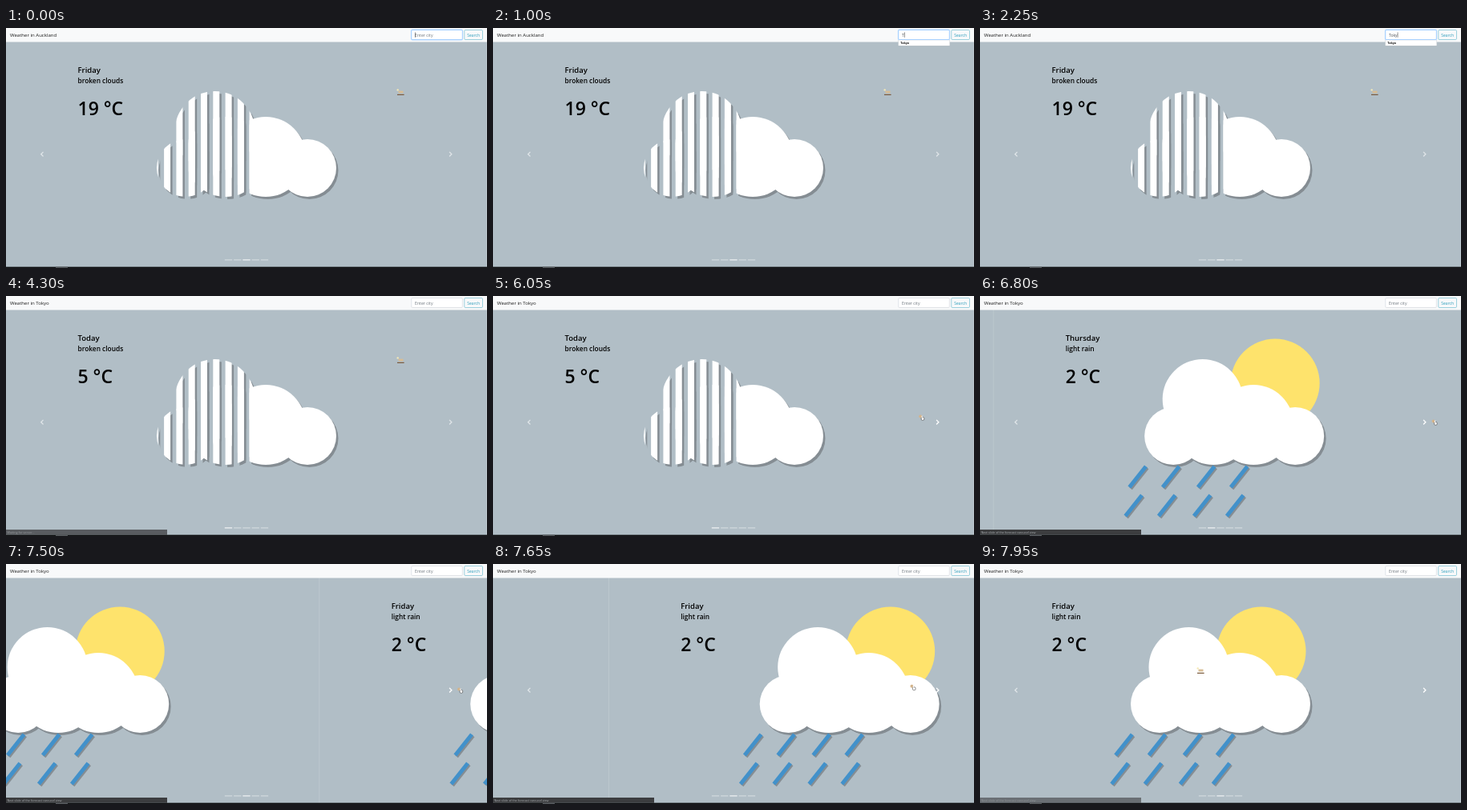
Animation, 600 px wide and 300 px high, one loop 8000 ms. Source, as an HTML page with a canvas:

```html
<!DOCTYPE html>
<html lang="en">
<head>
<meta charset="utf-8">
<title>Weather carousel</title>
<style>
  html, body { margin: 0; width: 100%; height: 100%; overflow: hidden; background: #b1bec6; }
  canvas { display: block; width: 600px; height: 300px; }
</style>
</head>
<body>
<canvas id="stage"></canvas>
<script>
const LOOP = 8000;
const PAGE_SWAP = 3600;
const SLIDE_STARTS = [6273, 7255];
const SLIDE_TIME = 600;
const SHADOW = '#858d93';
const FONT = '"Open Sans", "Noto Sans", sans-serif';

const canvas = document.getElementById('stage');
const ctx = canvas.getContext('2d');
const ratio = window.devicePixelRatio || 1;
canvas.width = 600 * ratio;
canvas.height = 300 * ratio;

const clamp = v => Math.min(1, Math.max(0, v));
const ramp = (t, from, to) => clamp((t - from) / (to - from));
const mix = (a, b, k) => a + (b - a) * k;

// CSS ease-in-out: cubic-bezier(.42, 0, .58, 1)
function easeInOut(x) {
  let low = 0, high = 1;
  for (let i = 0; i < 20; i++) {
    const s = (low + high) / 2, r = 1 - s;
    if (1.26 * s * r * r + 1.74 * s * s * r + s ** 3 < x) low = s; else high = s;
  }
  return low * low * (3 - 2 * low);
}

function rect(x, y, w, h, color) {
  ctx.fillStyle = color;
  ctx.fillRect(x, y, w, h);
}

function box(x, y, w, h, fill, stroke) {
  ctx.beginPath();
  ctx.roundRect(x, y, w, h, 1.3);
  ctx.fillStyle = fill;
  ctx.fill();
  ctx.strokeStyle = stroke;
  ctx.lineWidth = 0.6;
  ctx.stroke();
}

function text(value, x, y, size, color, weight = 400) {
  ctx.font = `${weight} ${size}px ${FONT}`;
  ctx.fillStyle = color;
  ctx.fillText(value, x, y);
}

function disc(x, y, r, color) {
  ctx.fillStyle = color;
  ctx.beginPath();
  ctx.arc(x, y, r, 0, 7);
  ctx.fill();
}

function line(points, color, width) {
  ctx.strokeStyle = color;
  ctx.lineWidth = width;
  ctx.beginPath();
  points.forEach(([x, y]) => ctx.lineTo(x, y));
  ctx.stroke();
}

function shifted(dx, dy, draw) {
  ctx.save();
  ctx.translate(dx, dy);
  draw();
  ctx.restore();
}

function cloud(color, striped) {
  ctx.save();
  if (striped) {
    ctx.beginPath();
    for (let i = 0; i < 8; i++) ctx.rect(181.8 + 15.3 * i, 70, 8, 150);
    ctx.rect(303.6, 70, 120, 150);
    ctx.clip();
  }
  disc(224, 175, 36, color);
  disc(260.5, 129, 50, color);
  disc(274, 161, 50, color);
  disc(324, 161, 50, color);
  disc(376, 175, 36, color);
  ctx.restore();
}

function rain() {
  for (const [row, y] of [[0, 226], [-5, 262]]) {
    for (const column of [179.5, 221, 265, 306]) {
      const x = column + row;
      const drop = [[x + 10.3, y - 13], [x - 10.3, y + 13]];
      shifted(1.5, 1.6, () => line(drop, SHADOW, 5));
      line(drop, '#4291ca', 5);
    }
  }
}

function slide({ day, sky, degrees }, dx) {
  if (Math.abs(dx) >= 600) return;
  shifted(dx, 0, () => {
    const rainy = sky === 'light rain';
    shifted(2.5, 3, () => cloud(SHADOW, !rainy));
    if (rainy) disc(351, 109, 55.5, '#fee36c');
    cloud('#fff', !rainy);
    if (rainy) rain();
    rect(599.4, 17, 0.6, 282, '#c3cdd3');
    text(day, 89.5, 56, 9.5, '#000', 600);
    text(sky, 89.5, 69, 8.35, '#000', 600);
    text(degrees + ' °C', 89.5, 109, 23, '#000', 600);
  });
}

const AUCKLAND = { day: 'Friday', sky: 'broken clouds', degrees: 19 };
const TOKYO = [
  { day: 'Today', sky: 'broken clouds', degrees: 5 },
  { day: 'Thursday', sky: 'light rain', degrees: 2 },
  { day: 'Friday', sky: 'light rain', degrees: 2 }
];

function carousel(t) {
  const loaded = t >= PAGE_SWAP;
  if (loaded) {
    const position = SLIDE_STARTS.reduce(
      (sum, start) => sum + easeInOut(ramp(t, start, start + SLIDE_TIME)), 0);
    TOKYO.forEach((item, i) => slide(item, (i - position) * 600));
  } else {
    slide(AUCKLAND, 0);
  }

  const active = loaded ? SLIDE_STARTS.filter(start => t >= start).length : 2;
  for (let i = 0; i < 5; i++) {
    rect(272.8 + 11.25 * i, 289.4, 9.4, 1, `rgba(255,255,255,${i === active ? 1 : 0.5})`);
  }
  const hover = mix(0.6, 1, ramp(t, 5900, 6050));
  line([[46.5, 154.9], [43.7, 157.7], [46.5, 160.5]], 'rgba(255,255,255,.6)', 1.3);
  line([[553.1, 154.9], [555.9, 157.7], [553.1, 160.5]], `rgba(255,255,255,${hover})`, 1.3);
}

const KEY_TIMES = [900, 1550, 1750, 2050, 2400];

function navbar(t) {
  const loaded = t >= PAGE_SWAP;
  const focused = !loaded;
  rect(0, 0, 600, 17.5, '#f8f9fa');
  text('Weather in ' + (loaded ? 'Tokyo' : 'Auckland'), 5, 11, 6.05, '#1c1c1c');

  if (focused) {
    ctx.beginPath();
    ctx.roundRect(504.9, 1.6, 65.2, 13.8, 2);
    ctx.fillStyle = '#bfdeff';
    ctx.fill();
  }
  box(505.8, 2.5, 63.5, 12, '#fff', focused ? '#80bdff' : '#ced4da');
  box(571.8, 2.5, 22.7, 12, '#f8f9fa', '#5fb6ca');
  text('Search', 575.3, 10.5, 5, '#2b9dbb');

  const pressed = KEY_TIMES.filter(time => t >= time);
  const typed = loaded ? '' : 'Tokyo'.slice(0, pressed.length);
  if (typed) text(typed, 510, 10.5, 5, '#495057');
  else text('Enter city', 510, 10.5, 5.2, '#6c757d');

  const sinceKey = t - (pressed.at(-1) ?? 0);
  if (focused && sinceKey % 1000 < 500) {
    const caret = typed ? 510.2 + ctx.measureText(typed).width : 510;
    rect(caret, 5.4, 0.5, 6.4, '#222');
  }
  if (typed && t < 2900) {
    rect(505.5, 15, 64.3, 7.3, '#c4c8cb');
    rect(505.8, 15.2, 63.7, 6.8, '#fff');
    text('Tokyo', 508.3, 19.9, 3.7, '#111', 700);
  }
}

function statusBar(label, opacity) {
  if (opacity <= 0) return;
  ctx.globalAlpha = opacity;
  rect(0, 292, 201, 6.6, '#3c3d3f');
  text(label, 1.5, 296.8, 3.75, '#a9adb0');
  ctx.globalAlpha = 1;
}

function pointer(t) {
  const stops = [[5850, 492, 80], [6050, 535, 152], [6220, 568, 158], [7600, 567, 158], [7950, 275, 133]];
  let [, x, y] = stops[0];
  for (let i = 1; i < stops.length; i++) {
    const [from, x0, y0] = stops[i - 1], [to, x1, y1] = stops[i];
    if (t < from) break;
    const k = ramp(t, from, to);
    x = mix(x0, x1, k);
    y = mix(y0, y1, k);
  }
  shifted(x, y, () => {
    if (t > 5980 && t < 7700) {
      disc(-2, -1.5, 2, '#d3b48c');
      box(-1, -0.5, 3.6, 3.8, '#fff', '#444');
      rect(-0.6, -2.3, 1, 2.5, '#fff');
    } else {
      disc(-3.3, -2.6, 1.2, '#f5e9b5');
      rect(-2.5, -1.4, 6, 2.8, '#d8bd96');
      rect(-4, 2.8, 8.6, 1.2, '#7b5a3c');
    }
  });
}

function draw(t) {
  ctx.setTransform(ratio, 0, 0, ratio, 0, 0);
  rect(0, 0, 600, 300, '#b1bec6');
  carousel(t);
  navbar(t);
  statusBar('Waiting for server...', ramp(t, 3200, 3400) * (1 - ramp(t, 4220, 4550)));
  statusBar('Next slide of the forecast carousel view', ramp(t, 6100, 6300) * (1 - ramp(t, 7820, 8150)));
  rect(0, 298.6, 600, 1.4, '#0c0d0e');
  rect(62, 298.6, 15, 1.4, '#55595c');
  pointer(t);
}

function tick(now) {
  draw(now % LOOP);
  requestAnimationFrame(tick);
}
requestAnimationFrame(tick);
</script>
</body>
</html>
```
